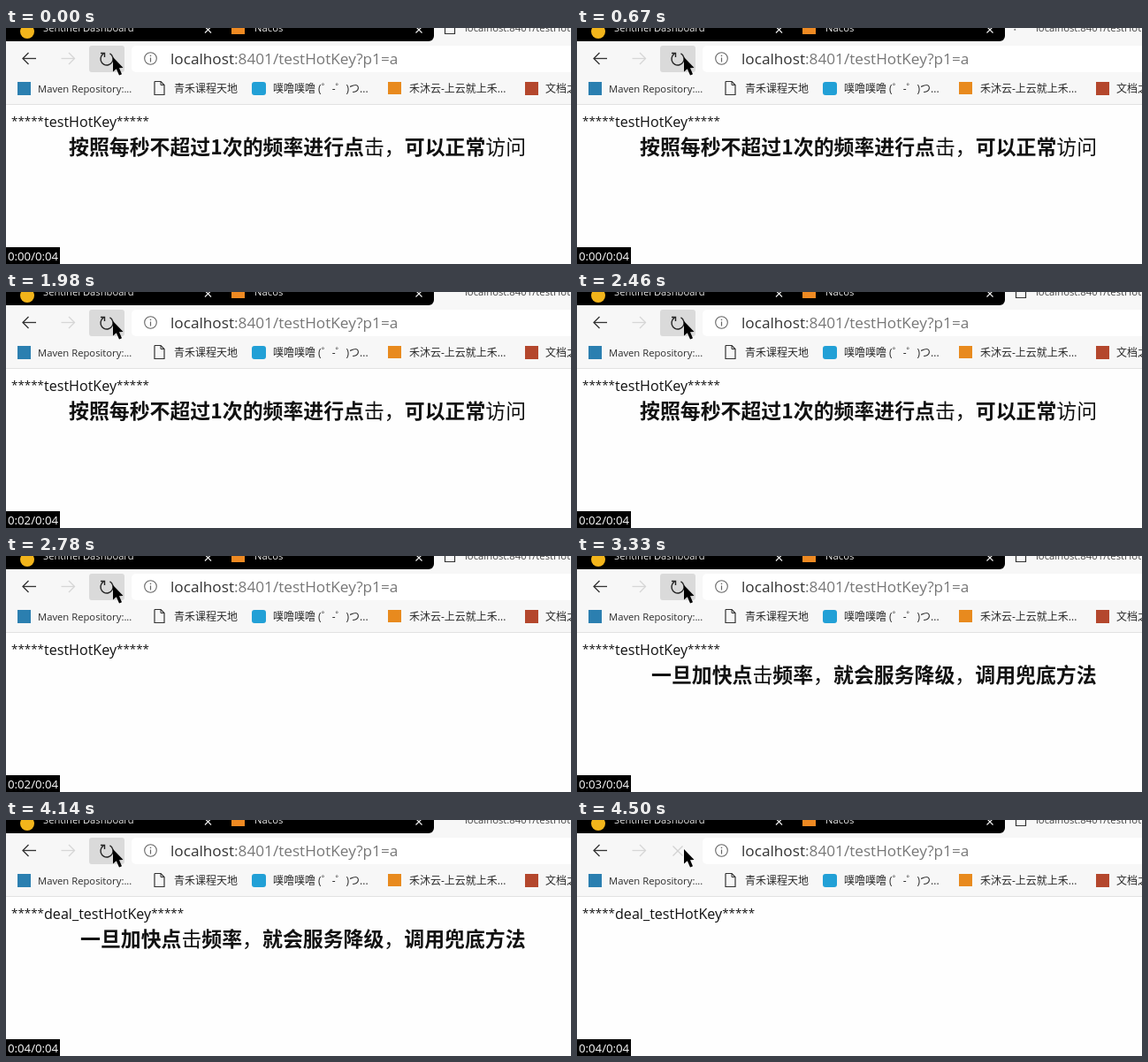
These frames come from a looping animation (639x267 px, 4.9 s). An HTML page with a canvas:

```html
<!DOCTYPE html>
<html lang="zh-CN">
<head>
<meta charset="utf-8">
<title>Hot key demo</title>
<style>
html, body { margin: 0; width: 100%; height: 100%; overflow: hidden; background: #fff; }
canvas { display: block; width: 639px; height: 267px; }
</style>
</head>
<body>
<canvas id="stage"></canvas>
<script>
const W = 639, H = 267, LOOP = 4900;
const FONT = '"Open Sans", "Noto Sans CJK SC", "Noto Sans CJK", sans-serif';
const CJK = '"Noto Sans CJK SC", "Noto Sans CJK", sans-serif';
const LOADS = [[590, 910], [1980, 2150], [3080, 3330], [3400, 3560], [3630, 3950], [4140, 4270]];
const SECONDS = [990, 1980, 2930, 3950];
const THIN = '击，访问';

const canvas = document.getElementById('stage');
const dpr = window.devicePixelRatio || 1;
canvas.width = W * dpr;
canvas.height = H * dpr;
const c = canvas.getContext('2d');
c.scale(dpr, dpr);

function rect(x, y, w, h, color, r = 0) {
  c.fillStyle = color;
  c.beginPath();
  c.roundRect(x, y, w, h, r);
  c.fill();
}

function text(str, x, y, size, color, family = FONT, weight = 400) {
  c.font = `${weight} ${size}px ${family}`;
  c.fillStyle = color;
  c.fillText(str, x, y);
  return x + c.measureText(str).width;
}

function line(points, color, width = 1.3) {
  c.strokeStyle = color;
  c.lineWidth = width;
  c.beginPath();
  points.forEach(([x, y], i) => i ? c.lineTo(x, y) : c.moveTo(x, y));
  c.stroke();
}

function arc(x, y, r, from, to, color, width = 1.3) {
  c.strokeStyle = color;
  c.lineWidth = width;
  c.beginPath();
  c.arc(x, y, r, from, to);
  c.stroke();
}

function cross(x, y, r, color, width) {
  line([[x - r, y - r], [x + r, y + r]], color, width);
  line([[x + r, y - r], [x - r, y + r]], color, width);
}

function page(x, y) {
  line([[x, y], [x + 7, y], [x + 11, y + 4], [x + 11, y + 15], [x, y + 15], [x, y]], '#333', 1.2);
  line([[x + 7, y], [x + 7, y + 4], [x + 11, y + 4]], '#333', 1);
}

function arrow(x, dir, color) {
  const tip = x + 7.5 * dir;
  line([[x - 7.5 * dir, 34.5], [tip, 34.5]], color);
  line([[tip - 6.5 * dir, 28], [tip, 34.5], [tip - 6.5 * dir, 41]], color);
}

function tabs(t) {
  rect(0, 0, 484, 15, '#000', [0, 0, 6, 0]);
  c.fillStyle = '#f3b51b';
  c.beginPath();
  c.arc(24, 4, 8, 0, Math.PI * 2);
  c.fill();
  text('Sentinel Dashboard', 42, 4, 11.2, '#e8e8e8');
  cross(228.5, 2, 3.5, '#eee', 1.2);
  rect(255, -5, 15, 12, '#ef8a22');
  text('Nacos', 281, 4, 11.3, '#e8e8e8');
  cross(467, 2, 3.5, '#eee', 1.2);

  const load = LOADS.find(([from, to]) => t >= from && t < to);
  if (load) {
    const step = Math.floor((t - load[0]) / 80);
    const a = Math.PI * 0.9 - (step - 1) * 0.9;
    arc(501, 0, 6, a - 0.15, a + 0.15, '#777', 1.8);
  } else {
    page(496.5, -8.5);
  }
  text('localhost:8401/testHotKey', 519, 4, 11.3, '#444');
}

function reload(t) {
  if (t >= 4500) {
    cross(114, 35, 5.5, '#d2d2d2', 1.2);
    return;
  }
  rect(94, 20, 40, 30, '#dadada', 3);
  arc(114, 35, 7, -1.05, Math.PI * 1.32, '#222', 1.4);
  line([[107, 28.5], [111.5, 28.5], [111.5, 33]], '#222', 1.4);
}

function toolbar(t) {
  arrow(26.5, -1, '#333');
  arrow(70, 1, '#d6d6d6');
  reload(t);
  rect(142, 20, 520, 30, '#fff', 5);
  arc(163.5, 34.5, 6.8, 0, Math.PI * 2, '#666', 1.1);
  line([[163.5, 33.5], [163.5, 38.5]], '#666', 1.2);
  rect(162.8, 30.7, 1.4, 1.4, '#666');
  const x = text('localhost', 186, 41, 17.2, '#333');
  text(':8401/testHotKey?p1=a', x, 41, 17.2, '#777');
}

function bookmarks() {
  const ink = '#2b2b2b';
  rect(13, 61, 15, 15, '#2b7fb0');
  text('Maven Repository:...', 36, 72.5, 11.25, ink);
  page(168, 60.5);
  text('青禾课程天地', 190, 72.5, 12, ink);
  rect(278, 61, 16, 15, '#22a0d6', 3);
  text('噗噜噗噜 (゜-゜)つ...', 302, 72.5, 12, ink);
  rect(432, 61, 15, 14, '#e88a1e');
  text('禾沐云-上云就上禾...', 456, 72.5, 12, ink);
  rect(587, 61, 15, 15, '#b4472d');
  text('文档之角', 610, 72.5, 12, ink);
}

function cursor() {
  c.fillStyle = '#000';
  c.beginPath();
  [[121, 33], [121, 49.5], [124.8, 46.3], [128, 53.5], [131, 52.2], [128, 45.2], [132.5, 45]]
    .forEach(([x, y]) => c.lineTo(x, y));
  c.closePath();
  c.fill();
}

function tooltip(t) {
  if (t < 1140 || t >= 1980) return;
  c.globalAlpha = t < 1220 ? 0.5 : 1;
  rect(131, 50, 82, 26, '#666');
  rect(132, 51, 80, 24, '#fff');
  text('刷新(Ctrl+R)', 139, 67, 12, '#444');
  c.globalAlpha = 1;
}

function response(t) {
  text('*****', 6, 110, 13.4, '#111');
  const end = text(t < 3800 ? 'testHotKey' : 'deal_testHotKey', 43, 112, 16.1, '#111');
  text('*****', end, 110, 13.4, '#111');
}

function caption(t) {
  let str = '', x = 0;
  if (t < 2780) {
    str = '按照每秒不超过1次的频率进行点击，可以正常访问';
    x = 71;
  } else if (t >= 2930 && t < 4200) {
    str = '一旦加快点击频率，就会服务降级，调用兜底方法';
    x = 84;
  }
  for (const ch of str) x = text(ch, x, 142.5, 22.9, '#111', CJK, THIN.includes(ch) ? 500 : 700);
}

function counter(t) {
  const s = SECONDS.filter(at => t >= at).length;
  rect(0, 248, 61, 19, '#000');
  text(`0:0${s}/0:04`, 2, 262.5, 13.2, '#fff');
}

function draw(now) {
  const t = now % LOOP;
  rect(0, 0, W, H, '#fefefe');
  rect(0, 0, W, 86, '#f7f7f7');
  rect(0, 86, W, 1, '#e2e2e2');
  tabs(t);
  toolbar(t);
  bookmarks();
  tooltip(t);
  cursor();
  response(t);
  caption(t);
  counter(t);
}

const start = performance.now();
function tick() {
  draw(performance.now() - start);
  requestAnimationFrame(tick);
}
tick();
</script>
</body>
</html>
```
